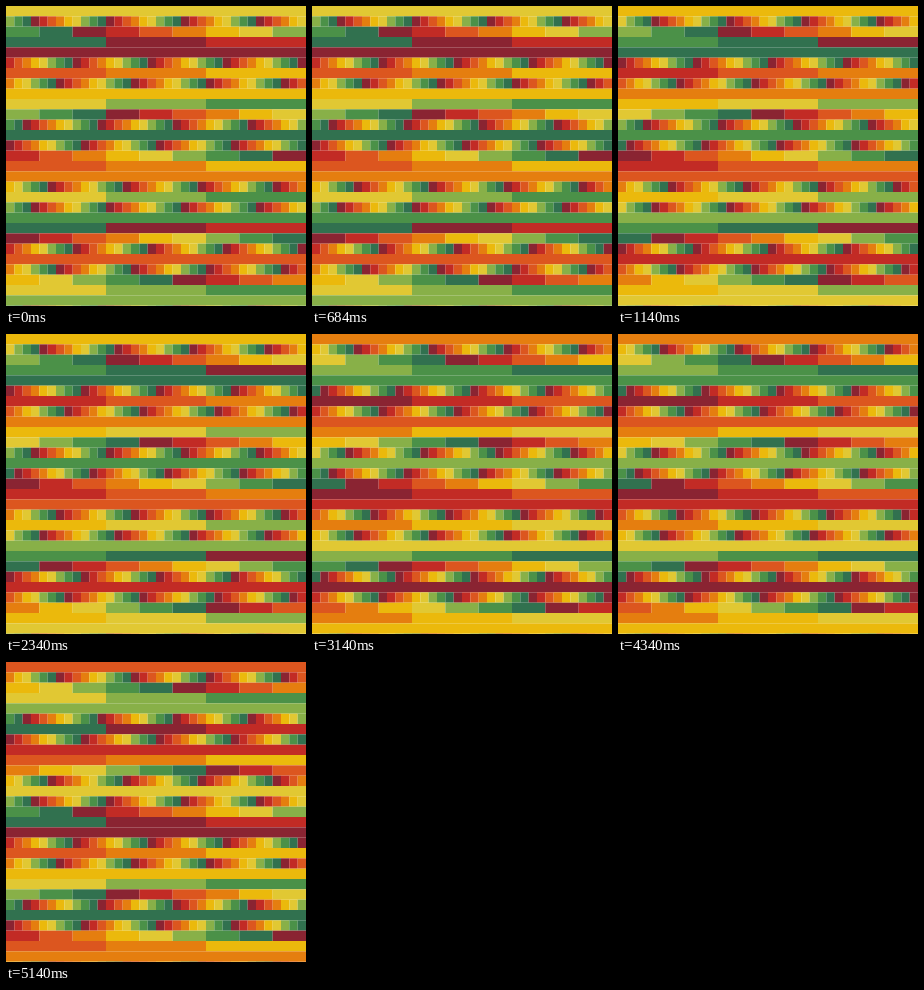
An HTML page with a canvas that plays this animation: 300x300 px, repeating every 6 s.

```html
<!DOCTYPE html>
<html lang="en">
<head>
<meta charset="utf-8">
<title>Colour bands</title>
<style>
  html, body { margin: 0; height: 100%; overflow: hidden; background: #fff; }
  canvas { display: block; }
</style>
</head>
<body>
<canvas id="stage" width="300" height="300"></canvas>
<script>
const ctx = document.getElementById('stage').getContext('2d');
const SIZE = 300, ROW_HEIGHT = 31 / 3, LOOP = 6000, STEP = 2000, LEAD = 860;
const COLORS = ['#8a2432', '#c22b25', '#dc561f', '#e57e0f', '#ebb90c',
                '#e1c833', '#88b048', '#4b9148', '#31714f'];
// Cells per row, repeating down the stage
const CELLS = [1, 36, 9, 3, 1, 36, 3, 36, 1, 3, 9, 36];

function draw(step) {
  ctx.fillStyle = '#fff';
  ctx.fillRect(0, 0, SIZE, SIZE);
  for (let row = 0; row * ROW_HEIGHT < SIZE; row++) {
    const count = CELLS[row % CELLS.length];
    const width = SIZE / count;
    for (let i = 0; i < count; i++) {
      ctx.fillStyle = COLORS[(row + i + 14 - step) % COLORS.length];
      // Fractional edges leave faint light seams between cells
      ctx.fillRect(i * width, row * ROW_HEIGHT, width, ROW_HEIGHT);
    }
  }
}

let shown = -1;
function tick() {
  const step = Math.floor((performance.now() % LOOP + LEAD) / STEP);
  if (step !== shown) draw(shown = step);
  requestAnimationFrame(tick);
}
tick();
</script>
</body>
</html>
```
